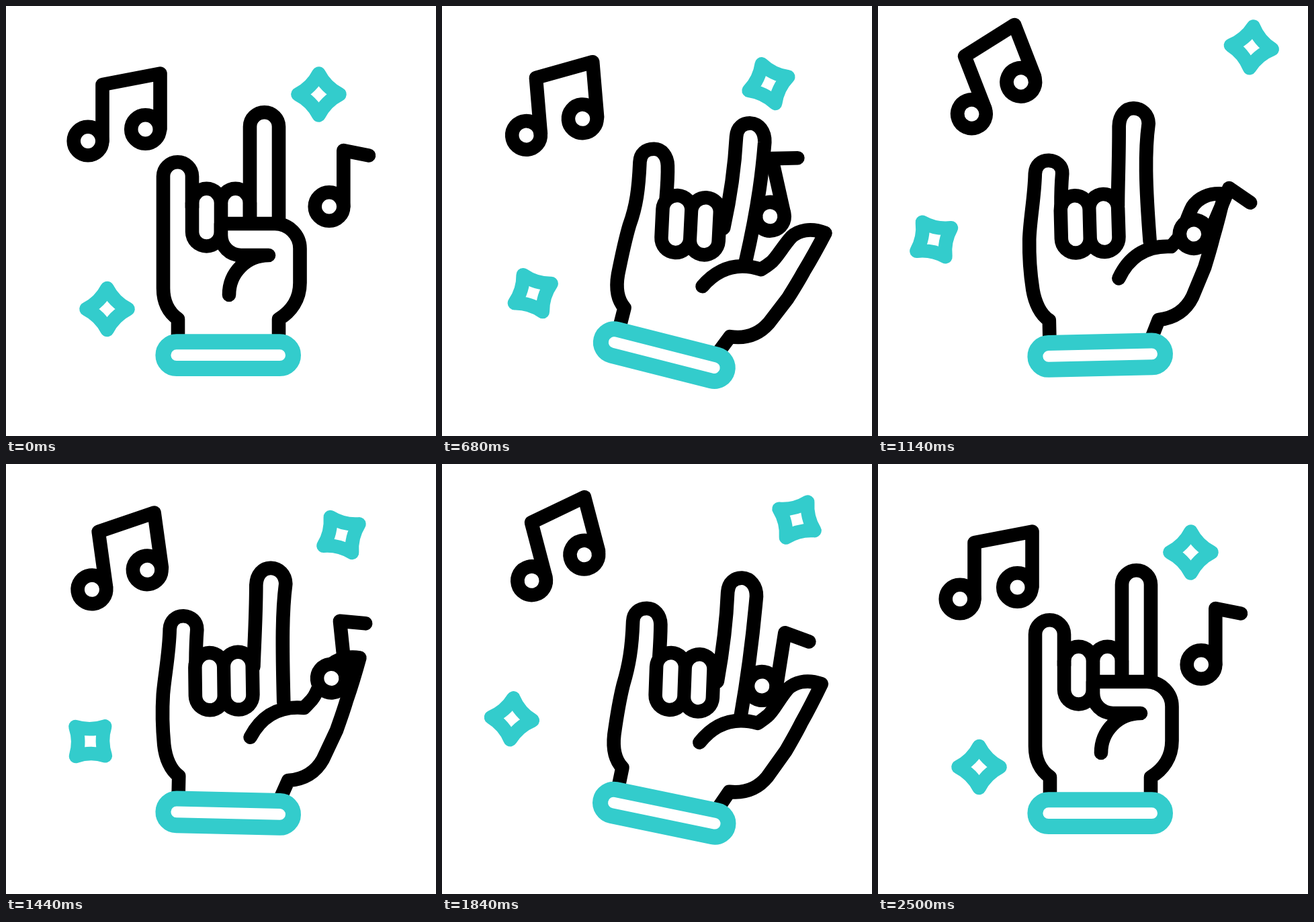
Recreate the animation shown at these times as an HTML page with a canvas. Size 640x640 px, loop 2.6 s.

```html
<!DOCTYPE html>
<html lang="en">
<head>
<meta charset="utf-8">
<title>Rock on</title>
<style>
  html, body { margin: 0; width: 100%; height: 100%; overflow: hidden; background: #fff; }
  canvas { display: block; }
</style>
</head>
<body>
<canvas id="stage" width="640" height="640"></canvas>
<script>
const ctx = document.getElementById('stage').getContext('2d');
const BLACK = '#000', TEAL = '#3cc', WHITE = '#fff';
const LOOP = 2600, END = 2500, LINE = 20.6;

// Finger outlines, drawn upright; every pose shares the same commands.
const pinky = {
  rest: 'M256 500 L256 466 C242 456 234 440 234 420 C234 393 234 367 234 340 C234 311 234 282 234 253.5 C234 241.8 243.6 232.3 255.5 232.3 C267.4 232.3 277 241.8 277 253.5 Q277 276 277 300',
  left: 'M256 500 L256 466 C244 458 235 440 231 420 C227 400 225 370 226 345 C226.5 315 243 275 253 245 C257 233 267 226.5 278.5 230 C290 234 297 241 292.5 251 Q284 275 279 300',
  right: 'M256 500 L256 466 C243 457 236 440 234.5 420 C233.5 400 232 370 233 345 C236 315 233 290 224.5 250 C222 238 228 229 240 226 C251 223 262 231 266 245 Q271 262 276 292'
};
const index = {
  rest: 'M363 324 C363 280 363 230 363 179.5 C363 167.7 372.7 158.2 384.6 158.2 C396.5 158.2 406 167.7 406 179.5 C406 230 406 280 406 350',
  left: 'M355.5 284 C357 262 366 228 376.5 181 C380 163 392 150 405 153.5 C417 157 424 165 421.5 177 C404 222 397 265 404 350',
  right: 'M370 315 C369 285 365 230 354.5 178 C352 164 359 156 370 153.5 C382 151 394 160 397.5 176 C404 213 412 265 414 355'
};
const ring = {
  rest: 'M298.5 293.3 L298.5 336',
  left: 'M300 300.7 L293 344',
  right: 'M296 305.4 L304.6 346.8'
};
const middle = {
  rest: 'M341.5 293.3 L341.5 336',
  left: 'M343 304.6 L336.5 349',
  right: 'M338 298 L346.5 339.5'
};
const thumb = {
  rest: 'M332 430 C332 397 358 371 391 371 C377 371 364 371 350 371 C333 371 320 358 320 341 C320 336 320 330 320 324 C347 324 373 324 400 324 C421 324 437.5 341 437.5 361 L437.5 412 C437.5 437 424 455 406 466 L406 500',
  tucked: 'M320 445 C319 412 337 385 367 375 C350 378 333 384 316 384 C302 384 291 372 289 357 C288 352 288 348 288 344 C316 340 344 335 372 331 C392 328 406 340 413 357 L423 418 C425 434 417 451 401 465 L404 500',
  open: 'M361 406 C378 372 405 358 440 360.5 C444 356 448 352 452 347 C459 339 464 318 473 302 C481 290 497 281 521 284 C516 304 510 326 503 348 C499 363 494 378 489 393 L470 436 C459 457 441 467 419 469 L406 500'
};

// [time, tilt, finger pose, thumb pose]
const keys = [
  [0, 0, 'rest', 'rest'],
  [400, -17.5, 'left', 'tucked'],
  [700, 14.6, 'right', 'open'],
  [1000, -14.6, 'left', 'open'],
  [1300, 14.6, 'right', 'open'],
  [1600, -14.6, 'left', 'open'],
  [1900, 14.6, 'right', 'open'],
  [2200, -14.6, 'left', 'open'],
  [END, 0, 'rest', 'rest']
];

const ease = u => u * u * (3 - 2 * u);
const mix = (a, b, u) => a + (b - a) * u;

function morph(a, b, u) {
  const target = b.match(/[\d.]+/g);
  let i = 0;
  return new Path2D(a.replace(/[\d.]+/g, n => mix(+n, +target[i++], u).toFixed(2)));
}

function stroke(path, color, width = LINE) {
  ctx.strokeStyle = color;
  ctx.lineWidth = width;
  ctx.stroke(path);
}

function fill(path) {
  ctx.fillStyle = WHITE;
  ctx.fill(path);
}

// Runs draw with the origin at (x, y), turned by the given degrees.
function at(x, y, degrees, draw) {
  ctx.save();
  ctx.translate(x, y);
  ctx.rotate(degrees * Math.PI / 180);
  draw();
  ctx.restore();
}

const cuff = new Path2D();
cuff.roundRect(233.9, 499.8, 193.6, 39.8, 19.9);

function drawHand(t) {
  const next = Math.max(1, keys.findIndex(k => k[0] >= t));
  const [t0, tilt0, pose0, thumb0] = keys[next - 1];
  const [t1, tilt1, pose1, thumb1] = keys[next];
  const u = ease((t - t0) / (t1 - t0));
  const part = shapes => morph(shapes[pose0], shapes[pose1], u);

  at(331, 520, mix(tilt0, tilt1, u), () => {
    ctx.translate(-331, -520);
    const folded = [part(ring), part(middle)];
    folded.forEach(f => stroke(f, BLACK, 63.4));
    folded.forEach(f => stroke(f, WHITE, 22.4));
    stroke(part(pinky), BLACK);
    stroke(part(index), BLACK);
    const thumbPath = morph(thumb[thumb0], thumb[thumb1], u);
    fill(thumbPath);
    stroke(thumbPath, BLACK);
    fill(cuff);
    stroke(cuff, TEAL, 23);
  });
}

const star = new Path2D('M31 0 Q10.5 10.5 0 31 Q-10.5 10.5 -31 0 Q-10.5 -10.5 0 -31 Q10.5 -10.5 31 0 Z');

function drawStar(x, y, degrees) {
  at(x, y, degrees, () => stroke(star, TEAL));
}

function drawHead(x, y) {
  const head = new Path2D();
  head.arc(x, y, 21.3, 0, 7);
  fill(head);
  stroke(head, BLACK);
}

const doubleStem = new Path2D('M-21.5 40 V-44 L64.5 -60.5 V22.5');
const singleStem = new Path2D('M2.8 31.5 V-52 L40.5 -44.5');

function drawDoubleNote(s) {
  at(165, 161 - 56.5 * s, -22.6 * s, () => {
    drawHead(-43, 40);
    drawHead(42.5, 22.5);
    stroke(doubleStem, BLACK);
  });
}

function drawSingleNote(s, t) {
  const low = t < 400 || t > 2000 ? 0 : -23;
  at(499.5, 267 + 54 * s, mix(low, 26, s), () => {
    drawHead(-18.5, 31.5);
    stroke(singleStem, BLACK);
  });
}

// Back and forth between 0 and 1, 400 ms each way, three times.
function swing(t) {
  const step = Math.min(t / 400, 6);
  const u = ease(step % 1);
  return step % 2 < 1 ? u : 1 - u;
}

function render(now) {
  const t = Math.min(now % LOOP, END);
  const s = swing(t);
  ctx.fillStyle = WHITE;
  ctx.fillRect(0, 0, 640, 640);
  ctx.lineCap = ctx.lineJoin = 'round';
  drawHand(t);
  drawDoubleNote(s);
  drawSingleNote(s, t);
  drawStar(465.5 + 96 * s, 131.5 - 74.5 * s, -90 * s);
  drawStar(150.5 - 71.5 * s, 451 - 110 * s, -131.5 * s);
}

const start = performance.now();
function loop() {
  render(performance.now() - start);
  requestAnimationFrame(loop);
}
loop();
</script>
</body>
</html>
```
